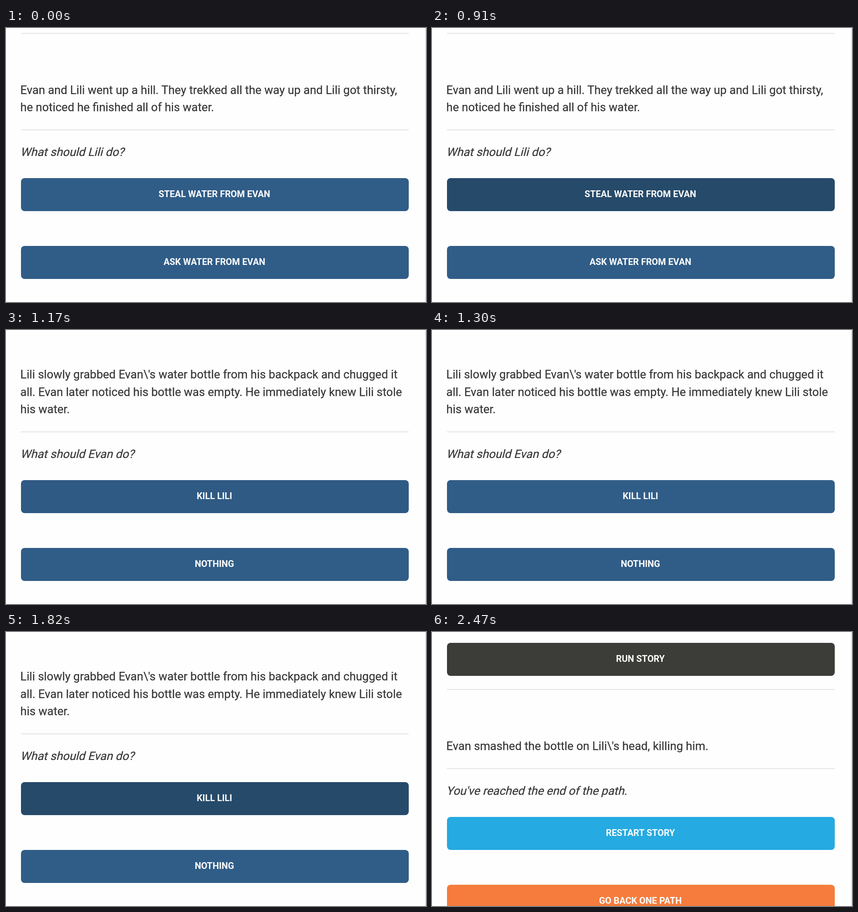
An HTML page that plays this animation: 925x606 px, repeating every 3900 ms.

```html
<!DOCTYPE html>
<html lang="en">
<head>
<meta charset="utf-8">
<title>Branching story</title>
<style>
  html, body { margin: 0; width: 100%; height: 100%; overflow: hidden; background: #fefefe; }
  svg { display: block; width: 100%; height: 100%; }
  text { font-family: Roboto, Arial, sans-serif; font-size: 25.6px; fill: #363636; stroke: #363636; stroke-width: 0.25px; }
  .label { font-size: 19.9px; font-weight: 600; fill: #fdfdfd; stroke: none; text-anchor: middle; }
</style>
</head>
<body>
<svg id="stage" viewBox="0 0 925 606"></svg>
<script>
const LOOP = 3900;
const LINE = 38.4;
const NAVY = '#305d87';
const stage = document.getElementById('stage');

function add(parent, tag, attrs, content) {
  const node = document.createElementNS('http://www.w3.org/2000/svg', tag);
  for (const key in attrs) node.setAttribute(key, attrs[key]);
  if (content) node.textContent = content;
  parent.appendChild(node);
  return node;
}

function rule(parent, y) {
  add(parent, 'rect', { x: 33, y, width: 854, height: 1.8, fill: '#e1e1e1' });
}

function button(parent, top, label, fill) {
  const y = Math.round(top);
  const box = add(parent, 'rect', { x: 33, y, width: 854, height: 73, rx: 8, fill });
  add(parent, 'text', { class: 'label', x: 459, y: y + 42.3 }, label);
  return box;
}

// shift moves the lower half of the page down by whole text lines
function scene({ shift = 0, lines, ask, choices, header }) {
  const group = add(stage, 'g', {});
  const dy = shift * LINE;
  const last = 184.2 + dy;
  lines.forEach((line, i) => {
    add(group, 'text', { x: 31.6, y: last - (lines.length - 1 - i) * LINE }, line);
  });
  rule(group, 224.4 + dy);
  // the question is the upright face, slanted
  add(group, 'text', { transform: `translate(31.6 ${282.8 + dy}) skewX(-14)` }, ask);
  const boxes = choices.map(([label, fill], i) =>
    button(group, 332 + dy + i * 150, label, fill || NAVY));
  if (header !== undefined) rule(group, header);
  return { group, first: boxes[0] };
}

const start = scene({
  lines: [
    'Evan and Lili went up a hill. They trekked all the way up and Lili got thirsty,',
    'he noticed he finished all of his water.'
  ],
  ask: 'What should Lili do?',
  choices: [['STEAL WATER FROM EVAN'], ['ASK WATER FROM EVAN']],
  header: 11
});

const theft = scene({
  lines: [
    "Lili slowly grabbed Evan\\'s water bottle from his backpack and chugged it",
    'all. Evan later noticed his bottle was empty. He immediately knew Lili stole',
    'his water.'
  ],
  ask: 'What should Evan do?',
  choices: [['KILL LILI'], ['NOTHING']]
});

const ending = scene({
  shift: 2,
  lines: ["Evan smashed the bottle on Lili\\'s head, killing him."],
  ask: "You've reached the end of the path.",
  choices: [['RESTART STORY', '#25aae1'], ['GO BACK ONE PATH', '#f57c3c']],
  header: 126.2
});
button(ending.group, 24, 'RUN STORY', '#3c3d38');

add(stage, 'rect', { x: 923, y: 0, width: 1.6, height: 606, fill: '#dedede' });

// [start time, scene, colour of its first button]
const steps = [
  [0, start, NAVY],
  [780, start, '#2b537a'],
  [910, start, '#264a6a'],
  [1040, theft, '#2d547f'],
  [1170, theft, '#2f5a84'],
  [1300, theft, NAVY],
  [1690, theft, '#2b537a'],
  [1820, theft, '#264a6a'],
  [2080, ending, '#25aae1']
];

function render(time) {
  const [, current, fill] = steps.filter(step => step[0] <= time).pop();
  for (const item of [start, theft, ending]) {
    item.group.setAttribute('display', item === current ? 'inline' : 'none');
  }
  current.first.setAttribute('fill', fill);
}

const origin = performance.now();
function tick() {
  render((performance.now() - origin) % LOOP);
  requestAnimationFrame(tick);
}
tick();
</script>
</body>
</html>
```
